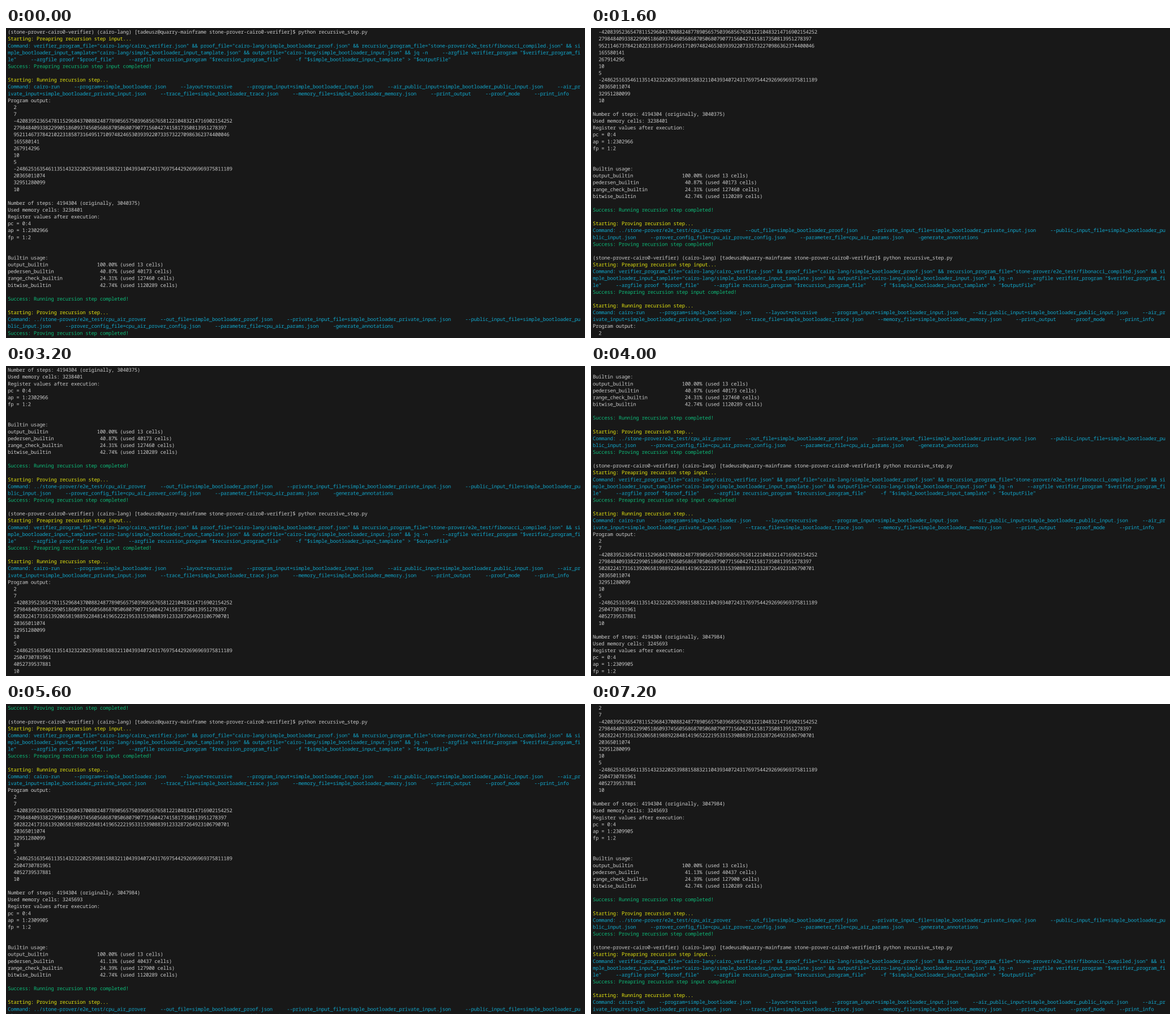
Write an HTML page with a canvas that moves like this. It is 1023 px wide and 547 px high and loops after 8000 ms.

```html
<!DOCTYPE html>
<html lang="en">
<head>
<meta charset="utf-8">
<title>Terminal</title>
<style>
  html, body { margin: 0; height: 100%; overflow: hidden; background: #181818; }
  canvas { display: block; width: 100%; height: 100%; }
</style>
</head>
<body>
<!-- Twice the stage size, for smooth small text. -->
<canvas id="term" width="2046" height="1094"></canvas>
<script>
// The terminal is laid out in its own pixels, then scaled to the canvas.
const WIDTH = 1610, HEIGHT = 861;
const COLS = 199, CELL_W = 8, CELL_H = 19, LEFT = 5, BASELINE = 16;
const LOOP = 8000, STEP = 800, ROWS_PER_STEP = 19 / 3;
const WHITE = '#cccccc', YELLOW = '#e5e510', CYAN = '#11a8cd', GREEN = '#0dbc79';

const lines = [];

// Adds text, wrapped at the terminal width.
function print(text = '', color = WHITE) {
  for (let i = 0; i === 0 || i < text.length; i += COLS)
    lines.push({ text: text.slice(i, i + COLS), color });
}

function stage(title, command, output) {
  print(`Starting: ${title}...`, YELLOW);
  print('Command: ' + command.join('     '), CYAN);
  if (output) output();
  print(`Success: ${title} completed!`, GREEN);
  print();
}

const prepare = [
  'verifier_program_file="cairo-lang/cairo_verifier.json"' +
  ' && proof_file="cairo-lang/simple_bootloader_proof.json"' +
  ' && recursion_program_file="stone-prover/e2e_test/fibonacci_compiled.json"' +
  ' && simple_bootloader_input_tamplate="cairo-lang/simple_bootloader_input_tamplate.json"' +
  ' && outputFile="cairo-lang/simple_bootloader_input.json" && jq -n',
  '--argfile verifier_program "$verifier_program_file"',
  '--argfile proof "$proof_file"',
  '--argfile recursion_program "$recursion_program_file"',
  '-f "$simple_bootloader_input_tamplate" > "$outputFile"'
];

const run = [
  'cairo-run',
  '--program=simple_bootloader.json',
  '--layout=recursive',
  '--program_input=simple_bootloader_input.json',
  '--air_public_input=simple_bootloader_public_input.json',
  '--air_private_input=simple_bootloader_private_input.json',
  '--trace_file=simple_bootloader_trace.json',
  '--memory_file=simple_bootloader_memory.json',
  '--print_output', '--proof_mode', '--print_info'
];

const prove = [
  '../stone-prover/e2e_test/cpu_air_prover',
  '--out_file=simple_bootloader_proof.json',
  '--private_input_file=simple_bootloader_private_input.json',
  '--public_input_file=simple_bootloader_public_input.json',
  '--prover_config_file=cpu_air_prover_config.json',
  '--parameter_file=cpu_air_params.json',
  '-generate_annotations'
];

function usage(name, percent, cells) {
  print(`${name}_builtin`.padEnd(31) + `${percent}%`.padStart(7) + ` (used ${cells} cells)`);
}

function session(r) {
  print('(stone-prover-cairo0-verifier) (cairo-lang) ' +
    '[tadeusz@quarry-mainframe stone-prover-cairo0-verifier]$ python recursive_step.py');
  stage('Preapring recursion step input', prepare);
  stage('Running recursion step', run, () => {
    print('Program output:');
    [
      '2', '7',
      '-420839523654781152968437008824877890565750396856765812210483214716902154252',
      '27984840933822990518609374560568687050680790771560427415817350813951278397',
      r.hash, ...r.input, '10', '5',
      '-248625163546113514323220253988158832110439340724317697544292696969375811189',
      ...r.result, '10'
    ].forEach(value => print('  ' + value));
    print();
    print(`Number of steps: 4194304 (originally, ${r.steps})`);
    print(`Used memory cells: ${r.memory}`);
    print('Register values after execution:');
    print('pc = 0:4');
    print(`ap = 1:${r.ap}`);
    print('fp = 1:2');
    print();
    print();
    print('Builtin usage:');
    usage('output', '100.00', 13);
    usage('pedersen', ...r.pedersen);
    usage('range_check', ...r.range);
    usage('bitwise', '42.74', 1120289);
    print();
  });
  stage('Proving recursion step', prove);
}

const first = {
  hash: '952114673784210223185873164951710974824653039392207335732270986362374400046',
  input: ['165580141', '267914296'],
  result: ['20365011074', '32951280099'],
  steps: 3040375, memory: 3238401, ap: 2302966,
  pedersen: ['40.87', 40173], range: ['24.31', 127460]
};
const second = {
  hash: '502822417316139206581988922848141965222195331539088391233287264923106790701',
  input: ['20365011074', '32951280099'],
  result: ['2504730781961', '4052739537881'],
  steps: 3047984, memory: 3245693, ap: 2309905,
  pedersen: ['41.13', 40437], range: ['24.39', 127900]
};
[first, second, second].forEach(session);

const canvas = document.getElementById('term');
const ctx = canvas.getContext('2d');
const visibleRows = Math.ceil(HEIGHT / CELL_H);
ctx.scale(canvas.width / WIDTH, canvas.height / HEIGHT);
ctx.font = '14px "Noto Sans Mono", "DejaVu Sans Mono", monospace';
ctx.textRendering = 'geometricPrecision';

function draw(top) {
  ctx.fillStyle = '#181818';
  ctx.fillRect(0, 0, WIDTH, HEIGHT);
  lines.slice(top, top + visibleRows).forEach(({ text, color }, row) => {
    ctx.fillStyle = color;
    [...text].forEach((char, col) =>
      ctx.fillText(char, LEFT + col * CELL_W, BASELINE + row * CELL_H));
  });
}

const start = performance.now();
let shown = -1;

function tick() {
  const time = (performance.now() - start) % LOOP;
  const top = Math.round(Math.floor(time / STEP) * ROWS_PER_STEP);
  if (top !== shown) draw(shown = top);
  requestAnimationFrame(tick);
}
tick();
</script>
</body>
</html>
```
